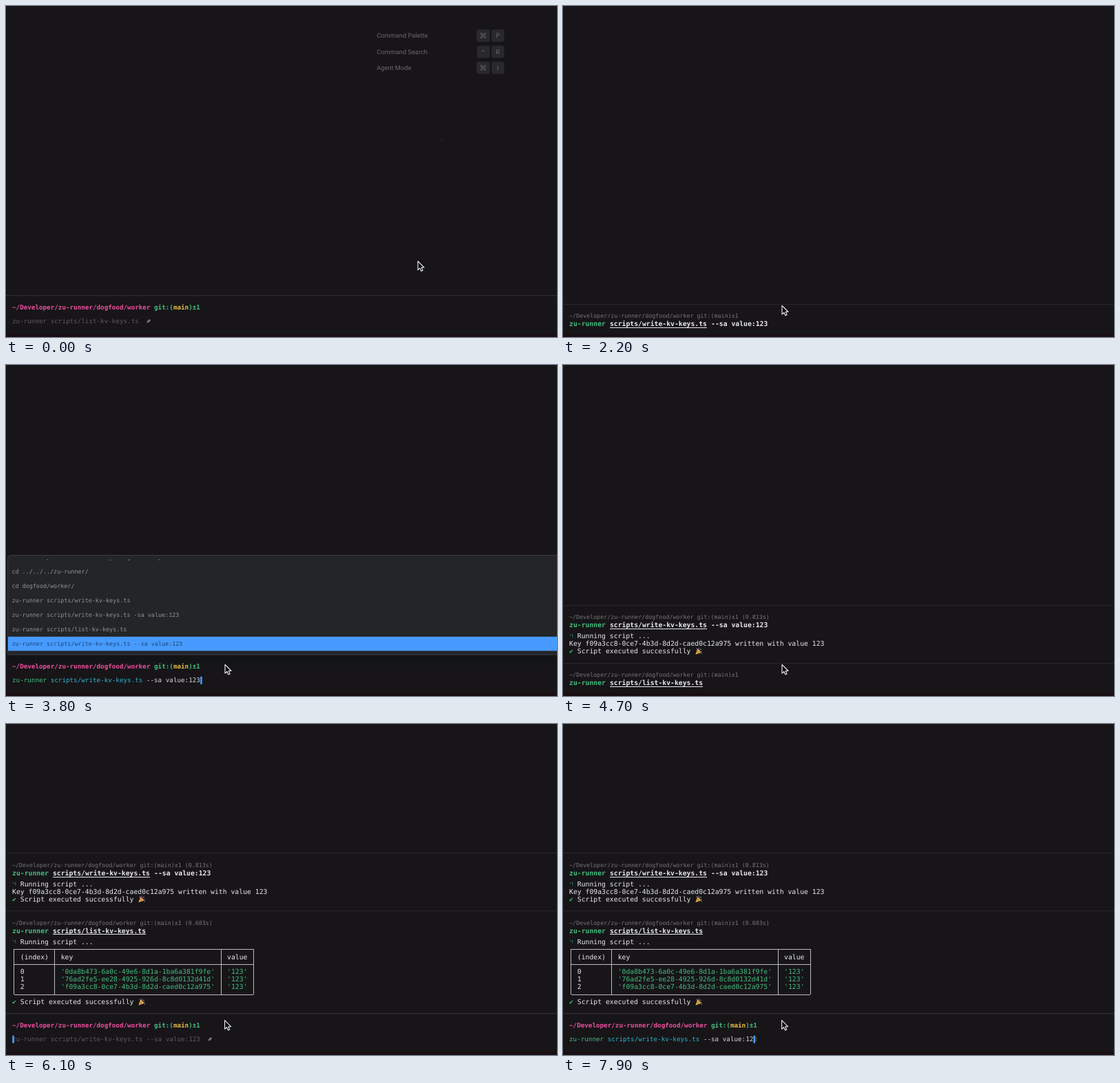
Recreate the animation shown at these times as an HTML page. Size 800x481 px, loop 8000 ms.

```html
<!DOCTYPE html>
<html lang="en">
<head>
<meta charset="utf-8">
<title>Terminal session</title>
<style>
  html, body { margin: 0; width: 100%; height: 100%; overflow: hidden; background: #171518; }
  svg { display: block; width: 800px; height: 481px; }
  text { white-space: pre; text-rendering: geometricPrecision; }
  .mono { font-family: "DejaVu Sans Mono", monospace; }
  .ui { font-family: Roboto, sans-serif; fill: #69676b; }
  .b { font-weight: 700; }
  .crisp { shape-rendering: crispEdges; }
</style>
</head>
<body>
<svg id="stage" viewBox="0 0 800 481" xmlns="http://www.w3.org/2000/svg">
  <defs>
    <clipPath id="listClip"><rect x="3" y="282" width="797" height="139"/></clipPath>
    <linearGradient id="shade" x1="0" y1="0" x2="0" y2="1">
      <stop offset="0" stop-color="#101314"/>
      <stop offset="1" stop-color="#171518"/>
    </linearGradient>
  </defs>
  <rect width="800" height="481" fill="#171518"/>
  <rect y="477" width="800" height="4" fill="#1a0e13"/>
  <g id="welcome"></g>
  <g id="blocks"></g>
  <g id="prompt"></g>
  <g id="menu"></g>
  <path id="mouse" d="M0 0V12.7L2.9 10 4.9 14.4 7.1 13.4 5.2 9.1H9Z" fill="#0c0b0d" stroke="#f4f4f4" stroke-width="1.1" stroke-linejoin="round"/>
</svg>
<script>
const LOOP = 8000, STEP = 100;
const ADVANCE = 0.60205;
const SIZE = { prompt: 9.25, out: 9.78, head: 8.34, menu: 8.42 };
const LINE = 10.93, BLOCK_BASE = 62, DROP = 3.1;
const C = {
  green: "#43bd80", pink: "#ec4fa0", yellow: "#e6bb45", teal: "#30b1c8", white: "#e9e8ea",
  args: "#d6d5d8", dim: "#5b595d", head: "#777579", blue: "#479bff", rule: "#29272a"
};
const TOOL = "zu-runner";
const HOME = "~/Developer/" + TOOL + "/dogfood/worker";
const WRITE = { path: "scripts/write-kv-keys.ts", args: " --sa value:123" };
const LIST = { path: "scripts/list-kv-keys.ts", args: "" };
const full = c => TOOL + " " + c.path + c.args;
const HISTORY = [
  TOOL + " plan --name worker_dev git --stop",
  "cd ../../../" + TOOL + "/",
  "cd dogfood/worker/",
  TOOL + " scripts/write-kv-keys.ts",
  TOOL + " scripts/write-kv-keys.ts -sa value:123",
  full(LIST),
  full(WRITE),
  full(LIST)
];
const NEW_KEY = "f09a3cc8-0ce7-4b3d-8d2d-caed0c12a975";
const KEYS = ["0da8b473-6a0c-49e6-8d1a-1ba6a381f9fe", "76ad2fe5-ee28-4925-926d-8c8d0132d41d", NEW_KEY];

const $ = id => document.getElementById(id);
const rect = (x, y, w, h, fill, r = 0) =>
  `<rect x="${x}" y="${y}" width="${w}" height="${h}" rx="${r}" fill="${fill}"/>`;
const rule = (x, y, w, fill) =>
  `<rect class="crisp" x="${x}" y="${y}" width="${w}" height="1" fill="${fill}"/>`;

// Each part is [text, colour]; parts follow each other on the character grid.
function mono(x, y, size, parts, bold) {
  let col = 0, out = "";
  for (const [s, fill] of parts) {
    out += `<text class="mono${bold ? " b" : ""}" x="${x + col * size * ADVANCE}" y="${y}" font-size="${size}" fill="${fill}">${s}</text>`;
    col += s.length;
  }
  return out;
}
const colX = n => 9 + n * SIZE.out * ADVANCE;
const outText = (n, y, s, fill = C.white) => mono(colX(n), y + DROP, SIZE.out, [[s, fill]]);

function drawWelcome() {
  const command = (x, y) => {
    const loops = [[-1, -1], [1, -1], [1, 1], [-1, 1]].map(([a, b]) =>
      `<circle cx="${x + a * 2.6}" cy="${y + b * 2.6}" r="1.3"/>`).join("");
    return `<g fill="none" stroke="#69676b" stroke-width=".8">${loops}<rect x="${x - 1.3}" y="${y - 1.3}" width="2.6" height="2.6"/></g>`;
  };
  const caret = (x, y) =>
    `<path d="M${x - 2.2} ${y}L${x} ${y - 2.4} ${x + 2.2} ${y}" fill="none" stroke="#69676b" stroke-width=".9"/>`;
  const rows = [["Command Palette", command, "P"], ["Command Search", caret, "R"], ["Agent Mode", command, "I"]];
  return rows.map(([label, sign, key], i) => {
    const y = 43 + i * 23.4, left = sign === caret ? 684 : 683;
    return `<text class="ui" x="538.3" y="${y + 3.3}" font-size="9.25">${label}</text>` +
      rect(left, y - 9, 702.5 - left, 18, "#29282b", 3) + rect(705, y - 9, 18.3, 18, "#29282b", 3) +
      sign(692.8, y) +
      `<text class="ui" x="714.1" y="${y + 3.4}" font-size="9.4" text-anchor="middle">${key}</text>`;
  }).join("") + rect(627, 195, 9, 1, "#242226");
}

function spinner(y, done) {
  const dots = [[10, -2.4], [13, -2.4], done ? [13, 0] : [10, 0]];
  return dots.map(([x, dy]) => rect(x, y + dy, 1.3, 1.3, "#259e88")).join("");
}

function popper(x, y) {
  const bits = [[3, -3.4, "#e8625a"], [5.6, -4.2, "#58a8e8"], [8.4, -2.8, "#e8c04a"], [9.2, .6, "#d75a9a"], [9.6, 3, "#58b878"], [6.6, -1.2, "#e8625a"]];
  return `<path d="M${x + .8} ${y + 4.8}L${x + 3.4} ${y - 2.6} ${x + 8} ${y + 2.2}Z" fill="#e5ab3f"/>` +
    `<path d="M${x + 2.7} ${y - .6}L${x + 5.8} ${y + 3.1}" stroke="#a65e36" stroke-width="1"/>` +
    `<path d="M${x + 3.4} ${y - 2.6}Q${x + 6.8} ${y - 1.6} ${x + 8} ${y + 2.2}" fill="none" stroke="#f4d58a" stroke-width="1.1"/>` +
    bits.map(([a, b, f]) => `<circle cx="${x + a}" cy="${y + b}" r=".8" fill="${f}"/>`).join("");
}

function success(y) {
  return outText(0, y, "✔", C.green) + outText(2, y, "Script executed successfully") + popper(colX(31), y);
}

function table(lineY) {
  const [top, mid, bottom] = [1, 3, 7].map(lineY);
  const cols = [.5, 10.5, 51.5, 59.5].map(colX);
  const cell = (n, i, s, fill) => outText(n, lineY(i), s, fill);
  const d = [top, mid, bottom].map(y => `M${cols[0]} ${y}H${cols[3]}`).join("") +
    cols.map(x => `M${x} ${top}V${bottom}`).join("");
  return `<path class="crisp" d="${d}" fill="none" stroke="#bdbcbf" stroke-width="1"/>` +
    cell(2, 2, "(index)") + cell(12, 2, "key") + cell(53, 2, "value") +
    KEYS.map((k, i) => cell(2, 4 + i, String(i)) + cell(12, 4 + i, `'${k}'`, C.green) +
      cell(53, 4 + i, "'123'", C.green)).join("");
}

// A block has 0 output lines when just sent, 1 while running, more when finished.
function blockHeight(b) {
  return b.lines ? BLOCK_BASE + (b.lines - 1) * LINE : 45;
}

function drawBlock(b, top) {
  const done = b.lines > 1, lineY = i => top + 45 + i * LINE;
  const x0 = colX(TOOL.length + 1), x1 = colX(TOOL.length + 1 + b.cmd.path.length);
  let out = rule(0, top - .5, 800, C.rule) +
    mono(9, top + 20, SIZE.head, [[HOME + " git:(main)±1" + (done ? ` (${b.time}s)` : ""), C.head]]) +
    mono(9, top + 32.1, SIZE.out, [[TOOL + " ", C.green], [b.cmd.path, C.white], [b.cmd.args, C.white]], true) +
    rule(x0, top + 33.8, x1 - x0, C.white);
  if (b.lines) out += spinner(lineY(0), done) + outText(2, lineY(0), "Running script ...");
  if (done) {
    out += b.cmd === WRITE ? outText(0, lineY(1), `Key ${NEW_KEY} written with value 123`) : table(lineY);
    out += success(lineY(b.lines - 1));
  }
  return out;
}

function drawBlocks(list, bottom) {
  let y = bottom, out = "";
  for (const b of [...list].reverse()) {
    y -= blockHeight(b);
    out += drawBlock(b, y);
  }
  return out;
}

function drawPrompt({ input, ghost, cut, caret, menu }) {
  const step = SIZE.prompt * ADVANCE;
  let out = menu ? rect(0, 421, 800, 20, "url(#shade)") : rect(0, 420, 800, 1.5, "#2d2b2e");
  out += mono(9, 441, SIZE.prompt, [[HOME, C.pink], [" git:(", C.green], ["main", C.yellow], [")±1", C.green]], true);
  let at = 0;
  if (input) {
    const args = cut ? input.args.slice(0, -cut) : input.args;
    const rest = cut ? input.args.slice(-cut) : "";
    out += mono(9, 461, SIZE.prompt, [[TOOL + " ", C.green], [input.path, C.teal], [args, C.args], [rest, C.dim]]);
    at = full(input).length - cut;
  } else if (ghost) {
    const text = full(ghost), x = 9 + (text.length + 2) * step;
    out += mono(9, 461, SIZE.prompt, [[text, C.dim]]) +
      `<path d="M${x + .6} 460.6L${x + 1.2} 457.8 ${x + 4.4} 455 ${x + 6.2} 457 ${x + 3.2} 460Z" fill="#77757a"/>`;
  }
  if (caret) out += rect(9 + at * step + .2, 452.8, 2.6, 11, C.blue);
  return out;
}

function drawMenu({ last, pick }) {
  let rows = "";
  for (let i = 0; i < 7; i++) {
    const y = 405 - i * 21, on = i === pick;
    if (on) rows += rect(3, y - 10.2, 797, 20.6, C.blue);
    rows += mono(8.4, y + 2.9, SIZE.menu, [[HISTORY[last - i], on ? "#1c4677" : "#949496"]]);
  }
  return `<path d="M801 421H2.5V281.5Q2.5 276.5 7.5 276.5H801Z" fill="#232527" stroke="#3b3d40"/>` +
    `<g clip-path="url(#listClip)">${rows}</g>`;
}

function stateAt(t) {
  const s = { blocks: [], input: null, ghost: null, cut: 0, caret: t >= 100, menu: null, prompt: true };
  const within = (a, b) => t >= a && t < b;
  const lines = (start, end, n) => t < start ? 0 : t < end ? 1 : n;
  if (t >= 2000) s.blocks.push({ cmd: WRITE, time: "0.813", lines: lines(2900, 3000, 3) });
  if (t >= 4500) s.blocks.push({ cmd: LIST, time: "0.603", lines: lines(5300, 5400, 9) });
  s.prompt = !within(2000, 3000) && !within(4500, 5400);

  if (within(1000, 2000)) s.menu = { last: 6, pick: 0 };
  if (within(3800, 4500)) s.menu = { last: 6, pick: t < 4100 ? 0 : 1 };
  if (within(6700, 7300)) s.menu = { last: 7, pick: t < 7000 ? 0 : 1 };

  if (s.menu) s.input = HISTORY[s.menu.last - s.menu.pick] === full(LIST) ? LIST : WRITE;
  else if (t >= 7300) s.input = WRITE;
  if (t >= 7800) s.cut = 1;

  if (t < 1000 || within(3300, 3800)) s.ghost = LIST;
  if (within(5700, 6700)) s.ghost = WRITE;
  return s;
}

const ease = (t, a, b) => {
  const p = Math.min(1, Math.max(0, (t - a) / (b - a)));
  return p * p * (3 - 2 * p);
};

function render(t) {
  const s = stateAt(t);
  $("welcome").style.display = t < 2000 ? "" : "none";
  $("blocks").innerHTML = drawBlocks(s.blocks, s.prompt ? 421 : 478);
  $("prompt").innerHTML = s.prompt ? drawPrompt(s) : "";
  $("menu").innerHTML = s.menu ? drawMenu(s.menu) : "";
  const go = ease(t, 0, 600), lift = ease(t, 5600, 6000);
  $("mouse").setAttribute("transform", `translate(${598 - 280 * go - .4 * lift} ${370.9 + 64.5 * go - 4.8 * lift})`);
}

$("welcome").innerHTML = drawWelcome();
const begin = performance.now();
let shown = -1;
function tick() {
  const t = Math.floor(((performance.now() - begin) % LOOP) / STEP) * STEP;
  if (t !== shown) render(shown = t);
  requestAnimationFrame(tick);
}
tick();
</script>
</body>
</html>
```
